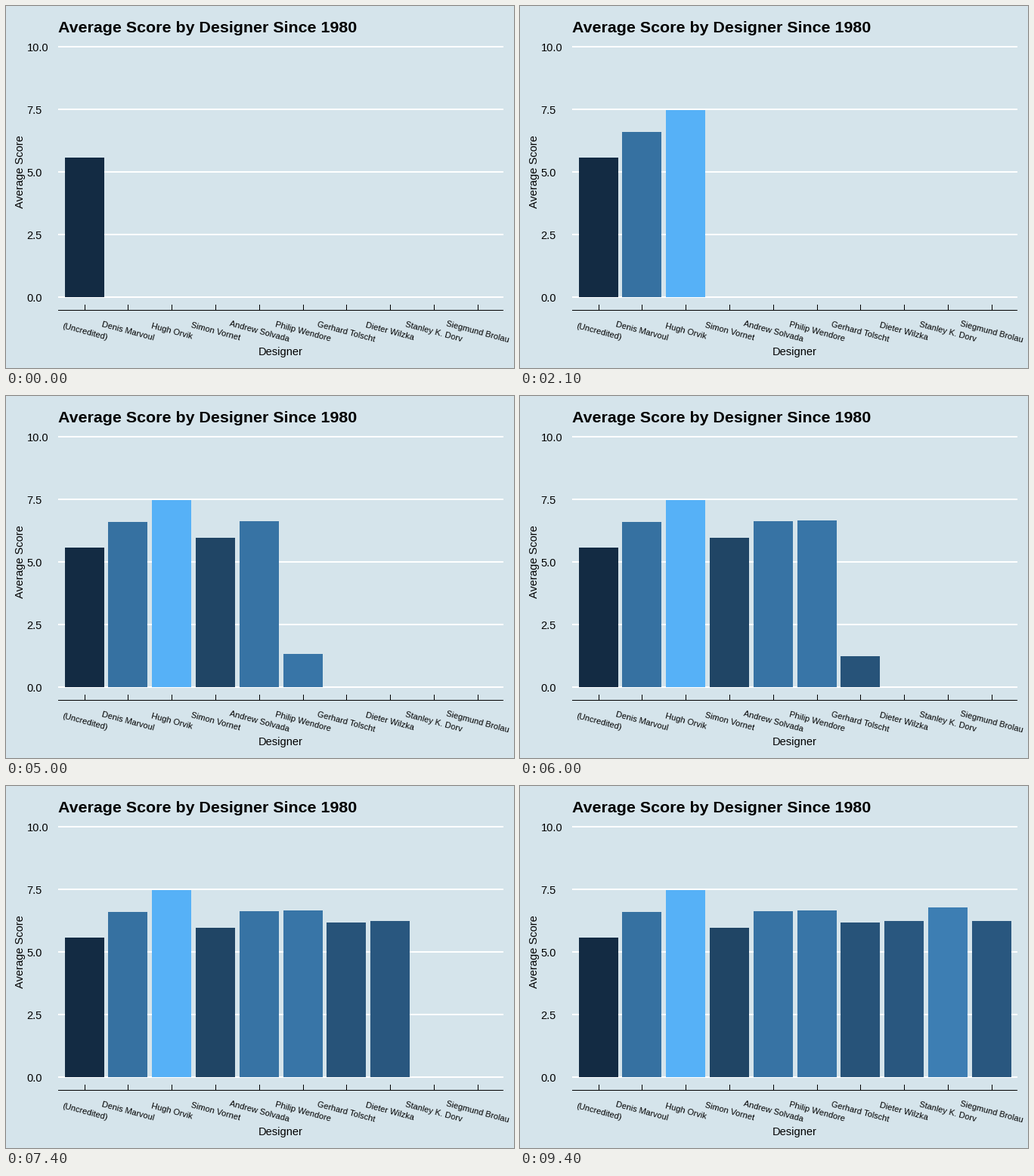
These frames come from a looping animation (672 px wide and 480 px high, 10000 ms). A matplotlib script:

```python
import math

import matplotlib.pyplot as plt
import numpy as np
from matplotlib.animation import FuncAnimation
from matplotlib.patches import Rectangle

W, H, DPI = 672, 480, 72  # at 72 dpi one point is one pixel
FRAMES, INTERVAL = 100, 100
GROW = 5
BASE = 386
LEFT, RIGHT = 69, 658
BAR_W, PITCH = 52, 57.78

NAMES = ["(Uncredited)", "Denis Marvoul", "Hugh Orvik", "Simon Vornet",
         "Andrew Solvada", "Philip Wendore", "Gerhard Tolscht",
         "Dieter Wilzka", "Stanley K. Dorv", "Siegmund Brolau"]
HEIGHTS = [185, 219, 248, 198, 220, 221, 205, 207, 225, 207]
STARTS = [-GROW, 6, 17, 28, 39, 50, 60, 70, 80, 90]
LOW, HIGH = np.array([19, 43, 67]) / 255, np.array([86, 177, 247]) / 255

plt.rcParams["font.family"] = "Liberation Sans"
fig = plt.figure(figsize=(W / DPI, H / DPI), dpi=DPI, facecolor="#d5e4eb")
ax = fig.add_axes([0, 0, 1, 1])
ax.set_xlim(0, W)
ax.set_ylim(H, 0)
ax.axis("off")


def box(x, y, w, h, color, z=1):
    return ax.add_patch(Rectangle((x, y), w, h, fc=color, lw=0,
                                  antialiased=False, zorder=z))


def label(x, y, text, size=14.67, **kw):
    ax.text(x, y, text, fontsize=size, va="baseline",
            rotation_mode="anchor", zorder=4, **kw)


def shade(height):
    t = (height - min(HEIGHTS)) / (max(HEIGHTS) - min(HEIGHTS))
    return LOW + (HIGH - LOW) * t ** 1.05


# Titles, grid and axis
label(LEFT, 35, "Average Score by Designer Since 1980", 21.4, weight="bold")
label(363.5, 463, "Designer", ha="center")
label(23.5, 220, "Average Score", ha="center", rotation=90)
for k in range(5):
    y = BASE - 83 * k
    box(LEFT, y - 1, RIGHT - LEFT, 2, "white")
    label(27.5, y + 6, f"{2.5 * k:.1f}")
box(LEFT, 403, RIGHT - LEFT, 1, "black")

bars = []
for i, (name, height) in enumerate(zip(NAMES, HEIGHTS)):
    x = math.floor(78.15 + PITCH * i)
    bars.append(box(x, BASE, BAR_W, 0, shade(height), 2))
    box(x + BAR_W // 2, 396, 1, 8, "black")
    label(x + BAR_W / 2 - 0.7, 434.7, name, 11.1, ha="center", rotation=-15)


def update(n):
    for bar, height, start in zip(bars, HEIGHTS, STARTS):
        part = min(max((n - start + 1) / GROW, 0), 1)
        h = round(height * part)
        bar.set_y(BASE - h)
        bar.set_height(h)
        bar.set_visible(h > 0)
    return bars


anim = FuncAnimation(fig, update, frames=FRAMES, interval=INTERVAL,
                     repeat=True, repeat_delay=0)
plt.show()
```
